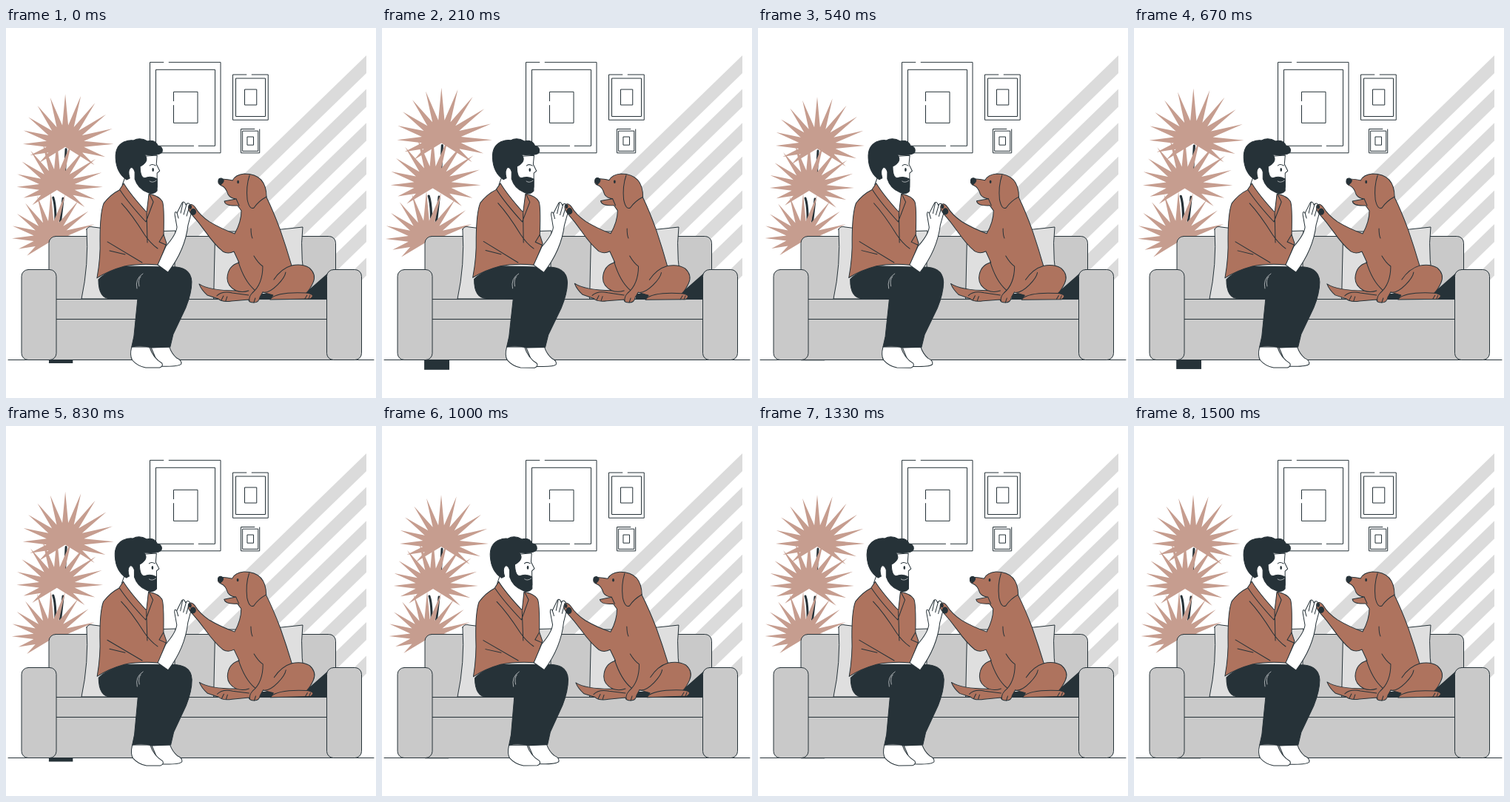
These frames come from a looping animation (500x500 px, 1540 ms). An HTML page:

```html
<!DOCTYPE html>
<html lang="en">
<head>
<meta charset="utf-8">
<title>High five on the sofa</title>
<style>
  html, body { margin: 0; width: 100%; height: 100%; overflow: hidden; background: #fff; }
  svg { display: block; width: 100%; height: 100%; }
  path, rect { stroke: #263238; stroke-width: 1; stroke-linejoin: round; stroke-linecap: round; }
  .line, #picture { fill: none; }
  #picture rect { vector-effect: non-scaling-stroke; stroke-linecap: butt; }
  .flat { stroke: none; }
  .stem { fill: none; stroke-width: 3; }
  .dark { fill: #263238; }
  .brown { fill: #ae735e; }
  .sofa { fill: #c9c9c9; }
  .pale { fill: #dfdfdf; }
  .white { fill: #fff; }
  .crease { fill: none; stroke: #c7cbcd; stroke-width: .8; }
</style>
</head>
<body>
<svg viewBox="0 0 500 500">
  <defs>
    <g id="picture">
      <rect width="95.500" height="122.500" pathLength="100" stroke-dasharray="4.300 1.500 100"/>
      <rect x="8" y="10" width="80" height="103" pathLength="100" stroke-dasharray="56.200 1.600 100"/>
      <rect x="32" y="40" width="32.500" height="42" pathLength="100" stroke-dasharray="88 3.500 100"/>
    </g>
  </defs>

  <g id="rays" fill="#dbdbdb"></g>
  <use href="#picture" transform="translate(194.500 46.300)"/>
  <use href="#picture" transform="translate(306.500 63) scale(.5)"/>
  <use href="#picture" transform="translate(317.500 136.500) scale(.264)"/>

  <g id="plant">
    <path class="stem" d="M81 166L79 205M64 230Q69 244 66 290M77 231Q76 243 70 290"/>
    <rect class="dark flat" x="58.300" y="400" width="31.700" height="49.300"/>
  </g>

  <path class="line" d="M3 448.500H497"/>
  <rect class="sofa" x="58" y="281.500" width="387.500" height="167" rx="9"/>
  <path class="pale" d="M109 272Q111 267 118 269Q170 277 229 274Q226 320 231 366H102Q112 320 109 272Z"/>
  <path class="pale" d="M283 275Q345 276 401 269Q396 310 408 366H281Z"/>
  <path class="sofa" d="M60 366.500H440V448.500H60ZM60 393.500H440"/>
  <path class="dark flat" d="M434 332L409 354L385 359H343V366.500H434Z"/>
  <rect class="sofa" x="21" y="326.500" width="47" height="122" rx="9"/>
  <rect class="sofa" x="433.500" y="326.500" width="47" height="122" rx="9"/>

  <g id="man">
    <path class="white" d="M196 431H221Q224 440 231 446Q238 449 237 454Q234 458 207 457Z"/>
    <path class="white" d="M170 431Q167 443 171 449Q178 457 189 459H208Q213 457 211 453Q199 446 194 431Z"/>
    <path class="dark" d="M125 340Q135 329 160 322L218 323Q250 320 251 343Q251 358 243 378L226 414L222 431L197 432Q183 428 170 431L173 417L178 366H142Q125 366 125 340Z"/>
    <path class="crease" d="M177 352Q174 339 185 332M180 349Q178 340 182 336"/>
    <path class="white" d="M176 174L204 172L203 184L207.500 193L204 196V215L193 226L191 256L157 212L165 190Z"/>
    <path class="brown" d="M159 210Q168 225 190 249L193 224Q207 227 211 234Q214 239 213 279L217 291L206 320Q180 318 160 322Q138 328 123 338Q128 310 127 285Q127 250 132 237Q141 225 153 219Z"/>
    <path class="line" d="M154 219Q165 236 189 262L199 235L194 225M190 250L191 290M156 237Q170 252 187 279Q195 291 205 298M137 289L184 317M140 301L161 306M213 279L207 289L216 293"/>
    <path class="white" d="M205 320L219 330Q242 300 246 266L250 251Q252 240 247 237Q245 236 243 239Q241 233 238 236L231 250Q228 246 228 252L231 269Q230 279 216 295Z"/>
    <path class="line" d="M239 236l-3 14m8-12l-4 14m8-12l-4 14m-13-4l2 7"/>
    <path class="dark" d="M163 205Q149 196 148 176Q147 160 159 154Q167 151 172 152Q181 147 191 153Q201 150 205 159Q212 160 211 167Q209 173 187 171Q194 179 183 186L176 189L174 194Q171 187 168 189Q164 193 167 203Z"/>
    <path class="dark" d="M174 189L181 186Q181 206 190 202Q197 200 204 204V220Q199 226 191 222Q178 217 174 204Z"/>
    <path class="line" d="M194 186Q197 183 202 186"/>
    <path class="crease" d="M194 207Q198 210 203 206"/>
    <ellipse class="dark" cx="198.500" cy="191.500" rx="1.300" ry="2.500"/>
  </g>

  <g id="dog">
    <path class="brown" d="M287 207Q289 202 306 206Q310 198 322 197Q352 197 352 229Q361 247 371 274Q379 297 386 321Q400 318 410 324Q420 333 415 344Q411 353 406 358Q420 360 411 366L357 367L361 361L347 357L343 364Q342 371 335 371Q328 371 328 367L305 369Q292 371 287 366L272 361Q264 354 261 346Q275 355 311 355Q299 349 299 338Q300 321 315 317L308 302Q300 306 293 302Q282 293 270 276Q260 262 250 251Q245 245 247 240Q251 236 256 243Q262 253 275 262Q290 271 309 278Q318 262 318 247L313 240Q296 241 295 234L311 231Q303 230 300 225Q297 215 291 213Q286 211 287 207Z"/>
    <path class="line" d="M329 199Q324 214 326 232Q329 246 335 243Q341 234 352 228M311 231l4 9M331 271Q331 280 333 284"/>
    <path class="line" d="M335 308Q341 318 347 322Q347 346 333 358Q328 363 329 369M314 316Q322 342 336 354M347 357Q355 359 367 347Q377 337 378 330M386 321Q372 325 362 340M357 366Q368 356 406 358M311 355Q319 358 328 355M285 362Q292 355 306 358L328 361"/>
    <path class="line" d="M291 368l3-6m3 7l2-6m36 8l2-6m67 1l3-5m2 5l2-5"/>
    <path class="dark" d="M287 208Q286 203 291 203Q296 205 293 209L290 212Z"/>
    <g class="dark">
      <ellipse cx="313.500" cy="208" rx="1.400" ry="2.200"/>
      <ellipse cx="249" cy="242" rx="2" ry="2.800"/>
      <ellipse cx="253" cy="248.500" rx="4" ry="4.500"/>
    </g>
  </g>
</svg>
<script>
const $ = id => document.getElementById(id);
const LOOP = 1540, CYCLE = 1500, FPS = 24, LEAD = 31;

// Parallel sunbeams that end behind the sofa.
function ray(i) {
  const right = 487, end = 350, slope = .97, top = 37 + i * 45.6, bottom = top + 24;
  const foot = y => right - (end - y) / slope;
  return `<path class="flat" d="M${right} ${top}V${bottom}L${foot(bottom)} ${end}H${foot(top)}Z"/>`;
}
$("rays").innerHTML = Array.from({ length: 7 }, (_, i) => ray(i)).join("");

// A palm fan: evenly turned spikes, the lowest ones shorter.
function fan(cx, cy, size) {
  const step = Math.PI / 10, points = [[cx, cy + 4]];
  const add = (a, r) => points.push([cx + r * size * Math.cos(a), cy - r * size * Math.sin(a)]);
  for (let i = -7; i <= 7; i++) {
    const a = Math.PI / 2 - i * step;
    const droop = 1 - .1 * Math.max(0, Math.abs(i) - 5);
    add(a, (60 + 4 * Math.cos(a) + 6 * Math.sin(a)) * droop);
    if (i < 7) add(a - step / 2, 25);
  }
  return `<polygon fill="#c69d8f" points="${points.join(" ")}"/>`;
}
$("plant").insertAdjacentHTML("beforeend", fan(61, 284, .92) + fan(69, 216, .95) + fan(80, 159, 1));

const bump = (p, peak, fall) => Math.max(0, Math.min(1 + (p - peak) / .1, 1 - (p - peak) / fall));
const triangle = p => Math.asin(Math.sin(2 * Math.PI * p)) * 2 / Math.PI;

function draw(now) {
  const step = Math.min(36, Math.floor((now % LOOP + 5) * FPS / 1000));
  const p = (step * 1000 / FPS + LEAD) / CYCLE;
  const scale = 1 + .1 * (bump(p, .1, .2) + bump(p, .5, .1));
  const angle = triangle(p);
  $("plant").setAttribute("transform", `translate(75.5 271) scale(${scale}) translate(-75.5 -271)`);
  $("man").setAttribute("transform", `rotate(${angle} 187 305)`);
  $("dog").setAttribute("transform", `rotate(${angle} 332 284)`);
}

let start;
function tick(now) {
  start ??= now;
  draw(now - start);
  requestAnimationFrame(tick);
}
draw(0);
requestAnimationFrame(tick);
</script>
</body>
</html>
```
